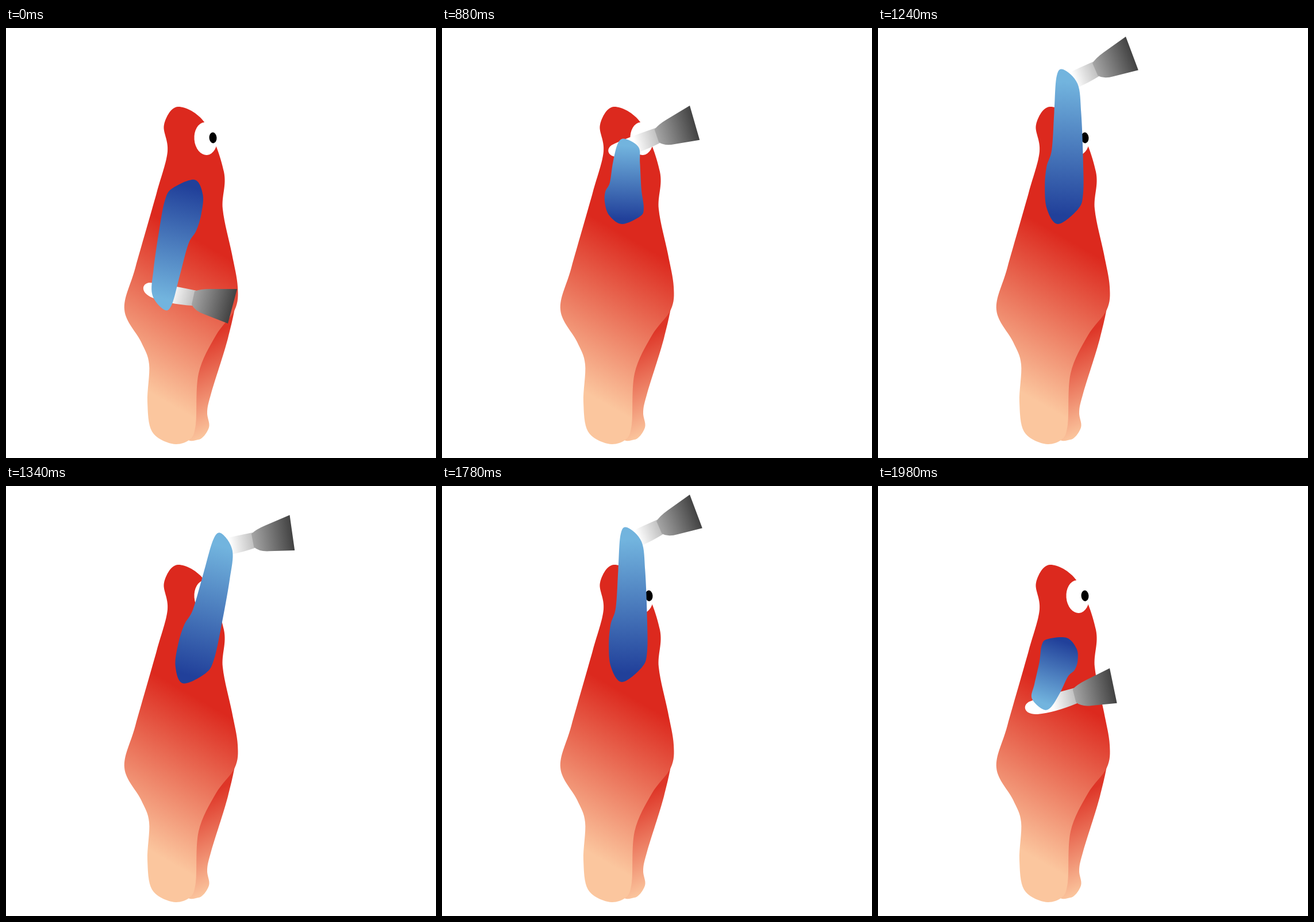
Animation, 748 px wide and 748 px high, one loop 2060 ms. Source, as an HTML page with a canvas:

```html
<!DOCTYPE html>
<html>
<head>
<meta charset="utf-8">
<style>
html, body { margin: 0; height: 100%; overflow: hidden; background: #fff; }
canvas { display: block; }
</style>
</head>
<body>
<canvas width="748" height="748"></canvas>
<script>
const ctx = document.querySelector('canvas').getContext('2d');

// Closed smooth curve through a few key points
function smooth(points) {
  const path = new Path2D(), at = i => points.at(i % points.length);
  path.moveTo(...points[0]);
  points.forEach((b, i) => {
    const a = at(i - 1), c = at(i + 1), d = at(i + 2);
    path.bezierCurveTo(b[0] + (c[0] - a[0]) / 6, b[1] + (c[1] - a[1]) / 6,
      c[0] - (d[0] - b[0]) / 6, c[1] - (d[1] - b[1]) / 6, ...c);
  });
  return path;
}

function ellipse(x, y, rx, ry) {
  const path = new Path2D();
  path.ellipse(x, y, rx, ry, -.08, 0, 7);
  return path;
}

function gradient(start, end, from, to) {
  const g = ctx.createLinearGradient(...start, ...end);
  g.addColorStop(0, from);
  g.addColorStop(1, to);
  return g;
}

function paint(path, fill) {
  ctx.fillStyle = fill;
  ctx.fill(path);
}

const body = smooth([[299, 137], [346, 165], [379, 250], [377, 315], [393, 393], [403, 450],
  [398, 490], [365, 535], [335, 601], [330, 690], [318, 717], [288, 723], [254, 702], [246, 650],
  [249, 585], [235, 546], [206, 490], [225, 417], [262, 287], [281, 215], [275, 168]]);
const leg = smooth([[400, 470], [386, 540], [357, 635], [350, 668], [353, 695], [335, 716],
  [310, 700], [325, 560], [385, 470]]);
const bodyFill = gradient([395, 405], [260, 640], '#dc291e', '#fbc69e');
const legFill = gradient([352, 535], [418, 679], '#de3527', '#fbc69e');
const eye = ellipse(347.5, 192.5, 20, 28.5);
const pupil = ellipse(360, 191, 6.5, 9.5);

// The scraper turns about the upper corner of its blade
const corner = [402, 454];
const handle = new Path2D('M250 443Q270 444 332 457L324 483Q282 480 254 469C233 460 236 444 250 443Z');
const blade = new Path2D('M328 458Q338 454 355 454H402L386 514L345 498Q328 492 323 481Z');
const handleFill = gradient([287, 456], [330, 468], '#fff', '#bcbcbc');
const bladeFill = gradient([325, 468], [395, 487], '#a6a6a6', '#404040');

// Arm outline: share of the length from shoulder to hand, distance from the axis
const outline = [[0, 0], [.095, 20], [.24, 25], [.37, 23], [.48, 15], [.72, 13], [.95, 11],
  [1, 0], [.91, -26], [.72, -34], [.42, -40], [.2, -42], [.1, -34]];

function makePose(shoulder, hand, bow, tool, turn, lean = 0) {
  const dx = hand[0] - shoulder[0], dy = hand[1] - shoulder[1], length = Math.hypot(dx, dy);
  const place = ([t, side]) => {
    const s = (side + bow * Math.sin(Math.PI * t)) / length;
    return [shoulder[0] + dx * t + dy * s, shoulder[1] + dy * t - dx * s];
  };
  const fill = gradient(place([.06, -8]), place([.92, -8]), '#21409a', '#72b4de');
  return { arm: smooth(outline.map(place)), fill, tool, turn, lean };
}

const lowered = [328, 264], raised = [313, 341];
const down = makePose(lowered, [275, 490], 0, corner, 0);
const low = makePose(lowered, [286, 388], 9, [403, 317], -26.7);
const middle = makePose(raised, [319, 193], 9, [431, 135], -31);
const up = makePose(raised, [322, 72], 0, [431, 15], -35.5);
const wave = { ...up, lean: 12.5 };

const timeline = [[0, down], [800, low], [880, middle], [980, up], [1080, wave], [1240, up],
  [1340, wave], [1540, up], [1640, wave], [1780, up], [1880, middle], [1980, low]];

// Turn about a pivot and carry the pivot to a new place
function turnAbout([x, y], degrees, to = [x, y]) {
  ctx.translate(...to);
  ctx.rotate(degrees * Math.PI / 180);
  ctx.translate(-x, -y);
}

function drawArm({ arm, fill, tool, turn, lean }) {
  ctx.save();
  turnAbout([300, 318], lean);
  ctx.save();
  turnAbout(corner, turn, tool);
  paint(handle, handleFill);
  paint(blade, bladeFill);
  ctx.restore();
  paint(arm, fill);
  ctx.restore();
}

function draw() {
  const time = performance.now() % 2060;
  ctx.clearRect(0, 0, 748, 748);
  paint(leg, legFill);
  paint(body, bodyFill);
  paint(eye, '#fff');
  paint(pupil, '#000');
  drawArm(timeline.findLast(([start]) => start <= time)[1]);
  requestAnimationFrame(draw);
}
draw();
</script>
</body>
</html>
```
